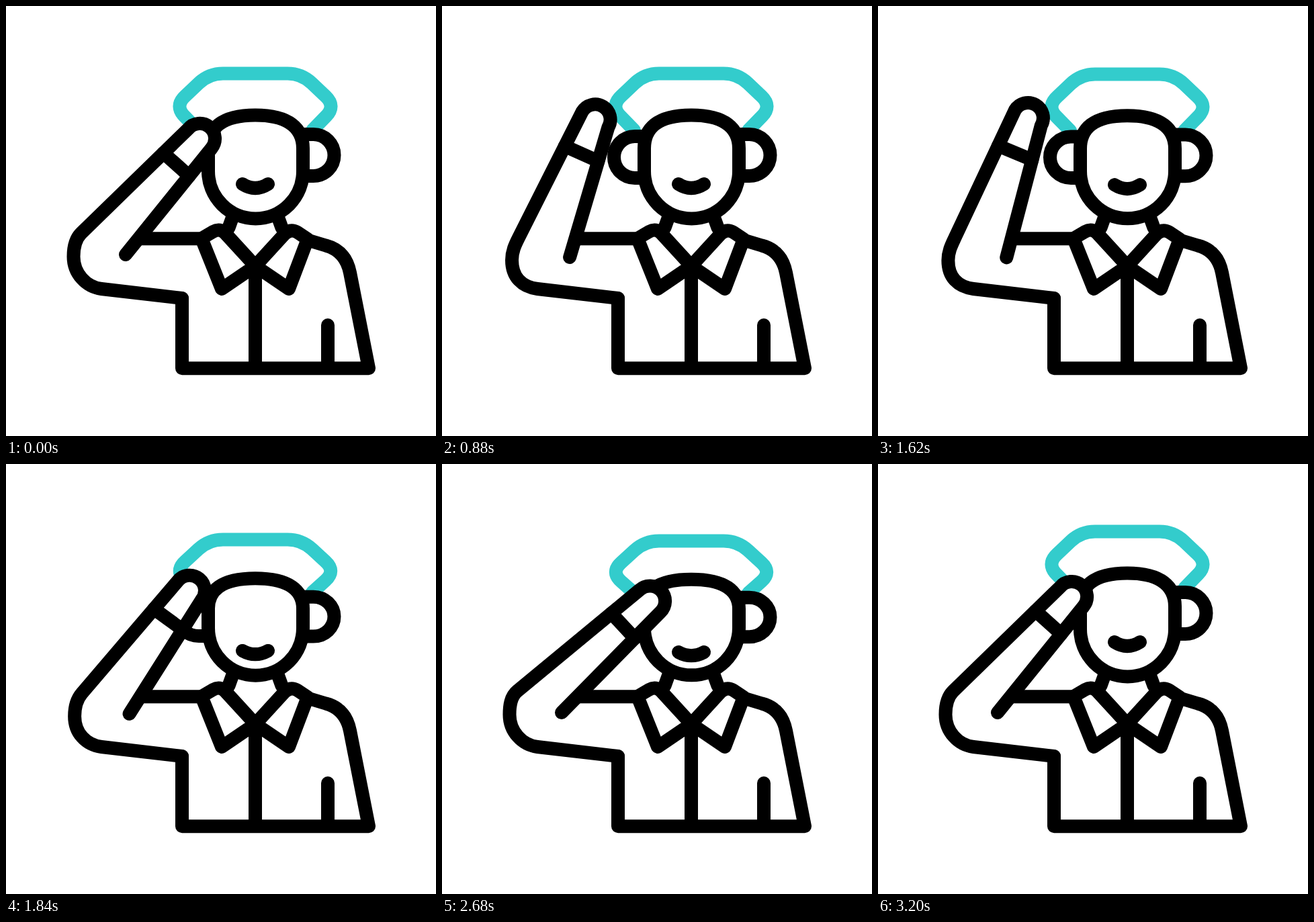
Write an HTML page that moves like this. It is 640 by 640 pixels and loops after 3.6 s.

```html
<!DOCTYPE html>
<html lang="en">
<head>
<meta charset="utf-8">
<title>Salute</title>
<style>
  html, body { margin: 0; width: 100%; height: 100%; overflow: hidden; background: #fff; }
  svg { display: block; width: 100vw; height: 100vh; }
  path { fill: none; stroke: #000; stroke-width: 20; stroke-linecap: round; stroke-linejoin: round; }
  .solid { fill: #fff; }
  #hat { stroke: #3cc; }
</style>
</head>
<body>
<svg viewBox="0 0 640 640">
  <path id="hat"/>
  <path d="M338 312 331.5 330M404 312 410.5 330"/>
  <path id="leftEar" class="solid"/>
  <path id="rightEar" class="solid"/>
  <path id="head" class="solid"/>
  <path id="mouth"/>
  <path d="M262 435V539.3H540L512 397C508 377 497 362 476 356.5L451 349M371 387V539M479 475V539M201 346.3H291"/>
  <path d="M291 346 308 336Q319 330 327 339L371 387 321 421ZM371 387 414 340Q423 331 434 337L449 347 421 421Z"/>
  <path id="arm" class="solid"/>
  <path id="cuff"/>
</svg>
<script>
const BEAT = 400, LOOP = 9 * BEAT, CENTER = 371;

const mix = (a, b, k) => a + (b - a) * k;
const between = (p, q, k) => [mix(p[0], q[0], k), mix(p[1], q[1], k)];
const draw = (id, d) => document.getElementById(id).setAttribute('d', d);

const blend = (a, b, k) => Object.fromEntries(Object.keys(a).map(key => [key, mix(a[key], b[key], k)]));

// x, y: middle of the fingertips; turn: tilt in degrees; lift: how far the elbow opens.
const salute = { x: 288.5, y: 197.5, turn: 39.6, lift: 0 };
const raised = { x: 218.5, y: 164.5, turn: 29.4, lift: 1 };
const deep = { x: 309.5, y: 204, turn: 46.7, lift: 0 };
const poses = [salute, blend(salute, raised, 0.5), raised, blend(raised, salute, 0.67),
  raised, deep, deep, deep, salute, salute];

// Open line through the points with softened inner corners.
function rounded(points, cut) {
  let d = `M${points[0]}`;
  for (let i = 1; i < points.length - 1; i++) {
    const [before, corner, after] = points.slice(i - 1, i + 2);
    const towards = p => between(corner, p, cut / Math.hypot(p[0] - corner[0], p[1] - corner[1]));
    d += `L${towards(before)}Q${corner} ${towards(after)}`;
  }
  return d + `L${points.at(-1)}`;
}

function drawArm(beat) {
  const i = Math.floor(beat);
  const { x, y, turn, lift } = blend(poses[i], poses[i + 1], beat - i);
  const angle = turn * Math.PI / 180, radius = 22.6;
  const dx = radius * Math.cos(angle), dy = radius * Math.sin(angle);
  const left = [x - dx, y - dy], right = [x + dx, y + dy];
  const inner = [178 + 14 * lift, 370 + 4.6 * lift];
  const elbow = [112 + 2.3 * lift, 338 + 8 * lift];
  const sideX = 100.5 + 4.1 * lift, sideY = 373 + 6 * lift;
  draw('arm', `M${inner}L${right}A${radius} ${radius} 0 0 0 ${left}L${elbow}` +
    `C${between(elbow, left, -0.055)} ${sideX} ${sideY - 13} ${sideX} ${sideY}` +
    `C${sideX} ${sideY + 25} 119 418 142 421L262 435`);
  draw('cuff', `M${between(left, elbow, 0.23 + 0.05 * lift)}L${between(right, inner, 0.26)}`);
}

function drawEar(id, innerX, outerX, top, bottom) {
  const sweep = outerX > innerX ? 1 : 0;
  draw(id, `M${innerX} ${top}H${outerX}A31 ${(bottom - top) / 2} 0 0 ${sweep} ${outerX} ${bottom}H${innerX}`);
}

function drawHead(nod) {
  const rim = [[85, 185 + 10 * nod], [120, 149 + 17 * nod], [69, 100.5 + 20 * nod]];
  const leftRim = rim.map(([x, y]) => [CENTER - x, y]);
  const rightRim = rim.map(([x, y]) => [CENTER + x, y]).reverse();
  draw('hat', rounded([...leftRim, ...rightRim], 21));

  const crown = 162.5 + 13 * nod, brow = 182.5 + 10 * nod, side = 212 + 5 * nod, jaw = 246 - 3 * nod;
  draw('head', `M301 ${jaw}V${side}C301 ${brow} 320 ${crown} ${CENTER} ${crown}` +
    `C422 ${crown} 442 ${brow} 442 ${side}V${jaw}A70.5 70.5 0 0 1 301 ${jaw}Z`);

  const lip = 265 + 21.5 * nod;
  draw('mouth', `M352 ${lip}Q${CENTER} ${277 + 19 * nod} 390 ${lip}`);
  drawEar('leftEar', 300, 287, 194 + 11 * nod, 256);
  drawEar('rightEar', 444, 457.5, 191 + 11 * nod, 253 + 6 * nod);
}

function render(t) {
  const beat = t / BEAT;
  const nodding = beat >= 4 && beat < 8;
  drawHead(nodding ? 1 - Math.abs(beat % 2 - 1) : 0);
  drawArm(beat);
  // The left ear shows only while the hand is away from the face.
  document.getElementById('leftEar').style.display = beat >= 0.15 && beat < 5 ? '' : 'none';
}

const start = performance.now();
function tick() {
  render((performance.now() - start) % LOOP);
  requestAnimationFrame(tick);
}
tick();
</script>
</body>
</html>
```
